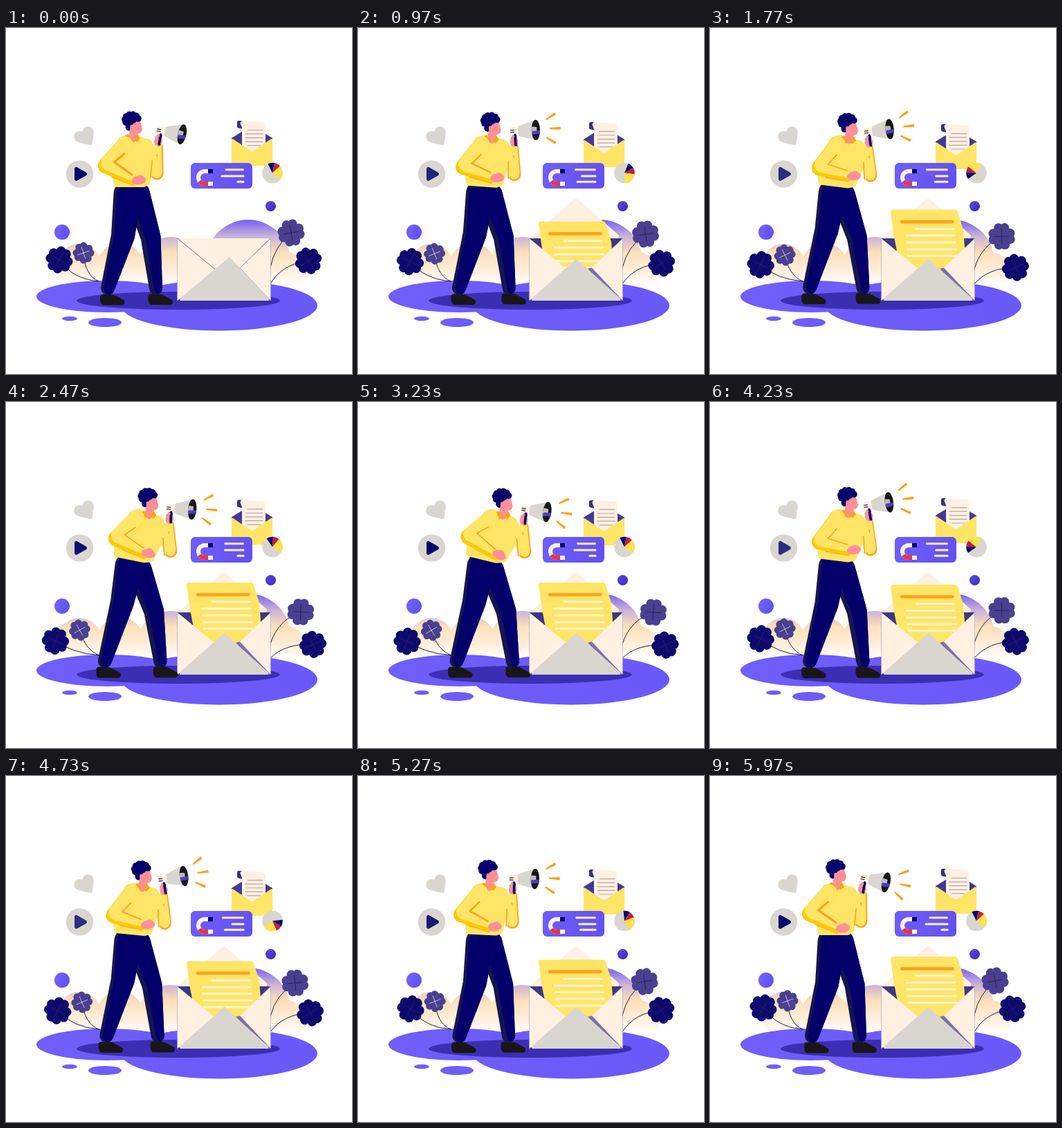
Write an HTML page with a canvas that moves like this. It is 500 px wide and 500 px high and loops after 6000 ms.

```html
<!DOCTYPE html>
<html lang="en">
<head>
<meta charset="utf-8">
<title>Announcement</title>
<style>
html, body { margin: 0; width: 100%; height: 100%; overflow: hidden; background: #fff; }
canvas { display: block; width: 100vw; height: 100vh; }
</style>
</head>
<body>
<canvas id="stage" width="500" height="500"></canvas>
<script>
const ctx = document.getElementById('stage').getContext('2d');
const LOOP = 6000, TAU = Math.PI * 2, RAD = Math.PI / 180;
const NAVY = '#04006b', DARK = '#15154f', SKIN = '#ff8f97', YELLOW = '#ffe566', GOLD = '#ffc800',
  ORANGE = '#ffa01c', CREAM = '#fff0e2', GREY = '#d9d6d0', PLUM = '#4a4090', BLACK = '#171717';

const clamp = x => Math.max(0, Math.min(1, x));
const lerp = (a, b, k) => a + (b - a) * k;
const ease = x => (1 - Math.cos(Math.PI * clamp(x))) / 2;
const cubic = x => x < .5 ? 4 * x ** 3 : 1 - 4 * (1 - x) ** 3;
const wave = (t, period) => (1 - Math.cos(TAU * t / period)) / 2;

function trace(p, r = 0) {
  const n = p.length;
  ctx.beginPath();
  ctx.moveTo((p[n - 2] + p[0]) / 2, (p[n - 1] + p[1]) / 2);
  for (let i = 0; i < n; i += 2) {
    const x = p[i], y = p[i + 1], nx = p[(i + 2) % n], ny = p[(i + 3) % n];
    const px = p[(i + n - 2) % n], py = p[(i + n - 1) % n];
    const d = Math.min(Math.hypot(nx - x, ny - y), Math.hypot(px - x, py - y));
    r ? ctx.arcTo(x, y, nx, ny, Math.min(r, d / 2)) : ctx.lineTo(x, y);
  }
  ctx.closePath();
}
function poly(p, fill, r) { trace(p, r); ctx.fillStyle = fill; ctx.fill(); }
function oval(x, y, rx, ry, fill, rot = 0) {
  ctx.beginPath();
  ctx.ellipse(x, y, rx, ry, rot, 0, TAU);
  ctx.fillStyle = fill;
  ctx.fill();
}
const disc = (x, y, r, fill) => oval(x, y, r, r, fill);
function line(p, color, w, cap = 'round') {
  ctx.beginPath();
  ctx.moveTo(p[0], p[1]);
  for (let i = 2; i < p.length; i += 2) ctx.lineTo(p[i], p[i + 1]);
  ctx.strokeStyle = color;
  ctx.lineWidth = w;
  ctx.lineCap = cap;
  ctx.lineJoin = 'round';
  ctx.stroke();
}
function grad(x0, y0, x1, y1, ...stops) {
  const g = ctx.createLinearGradient(x0, y0, x1, y1);
  stops.forEach((s, i) => g.addColorStop(i / (stops.length - 1), s));
  return g;
}
function at(x, y, rot, draw) {
  ctx.save();
  ctx.translate(x, y);
  ctx.rotate(rot);
  draw();
  ctx.restore();
}
// tapered tube through joints, one radius per joint
function limb(joints, radii, fill) {
  ctx.beginPath();
  for (let i = 1; i < joints.length; i++) {
    const [ax, ay] = joints[i - 1], [bx, by] = joints[i], ra = radii[i - 1], rb = radii[i];
    const dir = Math.atan2(by - ay, bx - ax);
    const off = Math.acos((ra - rb) / Math.hypot(bx - ax, by - ay));
    ctx.moveTo(ax + ra * Math.cos(dir + off), ay + ra * Math.sin(dir + off));
    ctx.arc(ax, ay, ra, dir + off, dir - off + TAU);
    ctx.arc(bx, by, rb, dir - off, dir + off);
    ctx.closePath();
  }
  ctx.fillStyle = fill;
  ctx.fill();
}
function shadedLimb(joints, radii, fill, shade, dx, dy) {
  ctx.save();
  limb(joints, radii, shade);
  ctx.clip();
  ctx.translate(dx, dy);
  limb(joints, radii, fill);
  ctx.restore();
}

function hills() {
  ctx.save();
  ctx.beginPath();
  for (const [x, y, r] of [[350, 338, 61], [402, 356, 33], [238, 352, 50], [165, 345, 34], [106, 344, 32]]) {
    ctx.moveTo(x + r, y);
    ctx.arc(x, y, r, 0, TAU);
  }
  ctx.rect(80, 350, 353, 22);
  ctx.clip();
  ctx.fillStyle = grad(0, 277, 0, 372, '#7462f5', '#c9b1d8', '#fddfb9', '#feedd8', '#ffffff');
  ctx.fillRect(60, 270, 400, 102);
  ctx.restore();
}

function ground() {
  const g = grad(44, 380, 450, 420, '#6f5ef8', '#6a59f9');
  oval(146, 388, 102, 23, g);
  oval(308, 401, 142, 36.5, g);
  oval(249, 394, 147, 13, '#3b2eb3');
  oval(92, 420, 11, 3.3, g);
  oval(143, 425.5, 24, 6.6, g);
}

function clover(x, y, r, rot, fill, vein) {
  at(x, y, rot, () => {
    disc(0, 0, r * .5, fill);
    for (let i = 0; i < 4; i++) {
      ctx.rotate(Math.PI / 2);
      disc(r * .63, -r * .3, r * .37, fill);
      disc(r * .63, r * .3, r * .37, fill);
    }
    for (let i = 0; i < 4; i++) {
      ctx.rotate(Math.PI / 2);
      line([0, 0, r * .42, r * .42], vein, .8);
    }
  });
}
function flower(x, y, r, rot, fill, vein, cx, cy, ex, ey) {
  ctx.beginPath();
  ctx.moveTo(x, y);
  ctx.quadraticCurveTo(cx, cy, ex, ey);
  ctx.strokeStyle = '#262230';
  ctx.lineWidth = 1;
  ctx.stroke();
  clover(x, y, r, rot, fill, vein);
}
function flowers(a) {
  const blue = '#0e0a6d', edge = '#252166';
  flower(77 - 6 * a, 335 + 11 * a, 18.5, -.25 - a * .15, blue, edge, 96, 363, 134, 366);
  flower(112 - 6 * a, 325 + 5 * a, 14.5, .45 - a * .2, PLUM, '#d4c9e8', 114, 358, 134, 366);
  flower(412 + 15 * a, 296 + 8 * a, 18.5, .6 + a * .25, PLUM, '#24204e', 388 + 5 * a, 315, 382, 346 + 4 * a);
  flower(437 + 7 * a, 336.5 + 15 * a, 18.5, .15 + a * .2, blue, edge, 398 + 6 * a, 341 + 8 * a, 382, 370);
}

function icons(u, a, b) {
  // heart
  disc(106, 157, 7.9, GREY);
  disc(118.5, 150.5, 8.3, GREY);
  poly([103, 164.6, 124.5, 169.5, 126.8, 150, 112, 150], GREY, 2.5);
  // play button
  disc(106.5, 211, 19.7, GREY);
  ctx.globalAlpha = 1 - .22 * b;
  poly([99, 199, 119.5, 211, 99, 222.5], NAVY, 2.5);
  ctx.globalAlpha = 1;

  disc(81, 295, 11, grad(70, 290, 92, 300, '#7261fa', '#6150ee'));
  disc(382.5, 257.5, 7.6, grad(375, 250, 390, 265, '#5b4ae8', '#3a2bb5'));

  at(0, 8 * a, 0, smallMail);

  // pie
  at(385, 209.5, cubic(u / 3000) * TAU, () => {
    disc(0, 0, 14.8, GREY);
    [[-116, -78, NAVY], [-78, -42, '#c41f3d'], [-42, 38, '#ffe04d']].forEach(([s, e, fill]) => {
      ctx.beginPath();
      ctx.moveTo(0, 0);
      ctx.arc(0, 0, 14.8, s * RAD, e * RAD);
      ctx.fillStyle = fill;
      ctx.fill();
    });
  });
  card(u, b);
}

function smallMail() {
  poly([326, 159, 355, 141, 385, 159, 385, 180, 326, 180], '#43389b', 1);
  poly([334, 134, 342, 134, 342, 146, 334, 144], '#383083', 2);
  poly([337, 134, 373, 136, 375, 142, 375, 181, 341, 181, 341, 144], CREAM, 3);
  for (let i = 0; i < 5; i++)
    line([i % 4 ? 346 : 349, 147.5 + i * 5.6, i < 4 ? 371 : 368, 147.5 + i * 5.6], '#b5a5a5', 1.2);
  poly([326, 159, 355.5, 179, 385, 159, 385, 199, 326, 199], YELLOW, 1.2);
}

function card(u, b) {
  poly([267, 195, 356, 195, 356, 232, 267, 232], grad(267, 200, 356, 228, '#6f5efa', '#6251ee'), 6);
  // magnet
  line([287, 207, 299, 207], CREAM, 6, 'butt');
  line([287, 225, 299, 225], CREAM, 6, 'butt');
  ctx.beginPath();
  ctx.arc(287, 216, 9, -90 * RAD, 90 * RAD, true);
  ctx.stroke();
  line([292, 207, 299, 207], NAVY, 6, 'butt');
  line([287, 225, 292, 225], '#ee3347', 6, 'butt');
  ctx.beginPath();
  ctx.arc(287, 216, 9, 145 * RAD, 90 * RAD, true);
  ctx.stroke();
  // text bars
  const x = u < 1150 ? lerp(335, 316, ease(u / 1150)) : lerp(316, 335, ease((u - 1150) / 1250));
  line([318 - 5 * b, 204.8, 342.5, 204.8], '#ffe9a8', 3);
  line([312 + 16 * b, 214, 343, 214], CREAM, 3);
  line([x, 222.3, 343, 222.3], CREAM, 3);
}

function letter(t) {
  const rest = 1 - clamp((t - 350) / 1750);
  const dip = t > 3690 ? 6.5 * wave(t - 3690, 2280) : 0;
  at(0, 45 * rest * rest + dip, 0, () => {
    poly([260.5, 261, 357, 261, 366, 290, 368.5, 321, 366, 372, 280, 372, 266, 300], YELLOW, 3);
    line([277, 278.5, 350.5, 278.5], ORANGE, 4.6);
    for (let i = 0; i < 5; i++) {
      const y = 288.8 + i * 9.7;
      line([i ? 282.5 + i : 298, y, 352 + i * 1.2, y], '#fff3d2', 3);
    }
  });
}

function bigMail(t) {
  const k = ease(t / 520);
  const h = lerp(60, -59, k), tip = lerp(320.6, 315, k);
  const flap = [248, 304, tip, 304 + h, 382, 304];
  if (h < 0) poly(flap, CREAM, 3);
  poly([247.5, 304, 382.5, 304, 382.5, 394, 247.5, 394], '#3f3682');
  ctx.save();
  ctx.beginPath();
  ctx.rect(240, 230, 150, 164);
  ctx.clip();
  if (t > 250) letter(t);
  ctx.restore();
  poly([247.5, 304, 306, 352, 247.5, 394], CREAM);
  poly([382.5, 304, 337, 347.5, 382.5, 394], CREAM);
  poly([332, 347.5, 338, 346.5, 382.5, 394, 370, 394], '#7a70a8');
  if (h > 0) {
    poly(flap, CREAM);
    line(flap, 'rgba(90,80,85,.75)', .7);
  }
  poly([247.5, 394, lerp(323, 315.5, k), lerp(331, 333.5, k), 382.5, 394], GREY, 2);
}

function legs(a) {
  const shoe = (x, y) => at(x, y, 0, () => poly([0, 0, 20, 1, 35, 9, 36, 16, 2, 16, 0, 10], BLACK, 4));
  shoe(136 - 6 * a, 384.5 - 2 * a);
  shoe(205.5 + 8 * a, 384 - 2 * a);
  shadedLimb([[190 + 3 * a, 240 + 3 * a], [209 + 5 * a, 302], [216.5 + 7 * a, 376 - a]], [18, 14.5, 9.5], NAVY, DARK, 7, 0);
  shadedLimb([[176 + 2 * a, 240 - 3 * a], [169 - a, 300 - 12 * a], [147 - 4.5 * a, 376 - 2 * a]], [20.5, 17, 10], NAVY, DARK, 4.5, 0);
}

function head(q) {
  const near = Math.min(q, 1), far = q - near;
  at(17 * near + 10.5 * far, 2.5 * near + 2 * far, 0, () => {
    disc(178, 143, 5.5, NAVY);
    poly([181, 133, 193, 131, 197, 146, 195.5, 151, 189.5, 153, 190, 162, 183, 166, 176, 161, 179, 148], SKIN, 2.5);
    oval(181, 132, 9, 6.5, NAVY);
    for (let i = 0; i < 7; i++) {
      const ang = (150 + i * 33) * RAD;
      disc(181.5 + 9.8 * Math.cos(ang), 132.5 + 7.8 * Math.sin(ang), 4.7, NAVY);
    }
    disc(180, 137, 4, NAVY);
    oval(181.5, 143, 2.2, 3.2, SKIN);
    poly([172, 156, 176, 153, 183, 161, 177, 165], ORANGE, 1);
    poly([185, 161, 190, 153, 194, 160, 189, 165], ORANGE, 1);
  });
}

function megaphone(x, y, tilt, t) {
  at(x, y, tilt * RAD, () => {
    poly([-2.5, -10, 3.5, -10, 4.5, 8, -1, 9], NAVY, 1.5);
    poly([-6.5, -19.5, 7, -20, 7, -7, -6.5, -8], CREAM, 2);
    line([-5, -15, 0, -15], BLACK, 1.2);
    line([-5, -12, 0, -12], BLACK, 1.2);
    poly([6, -20.5, 30, -29, 32, -14, 30, 0, 6, -7], GREY, 2);
    ctx.save();
    oval(31.5, -14.6, 6.2, 14.7, BLACK);
    ctx.clip();
    poly([24, -20, 33, -19, 33, -9, 24, -8], '#bdb9bb', 1);
    poly([26, -13, 38, -14, 38, -9, 26, -8], '#4b3cc8', 1);
    ctx.restore();

    const len = 16 * ease((t - 250) / 450);
    for (const k of len ? [-1, 0, 1] : [])
      at(30.5 + 21 * Math.cos(40 * RAD * k), -16.5 + 20 * Math.sin(40 * RAD * k), 32 * RAD * k, () =>
        poly([0, -1, len, -2, len, 2, 0, 1], ORANGE, .6));

    oval(0, 2, 5.8, 6.8, SKIN, .2);
    line([1.5, -8, 2, 6], NAVY, 3.6);
    line([-4, -3, -1, -6], SKIN, 3.4);
  });
}

// each joint: leaning back, middle, leaning forward
const JOINTS = {
  shoulderL: [[172, 168], [184, 168], [192, 168]],
  elbowL: [[144.5, 199], [158.5, 202], [160, 194]],
  wristL: [[183, 220], [199, 214], [200, 222]],
  shoulderR: [[202, 170], [213, 172], [221, 176]],
  elbowR: [[218, 210], [232, 213], [241.5, 217]],
  wristR: [[220.5, 172], [229.5, 174], [241, 180]]
};
function joint(name, q) {
  const i = q < 1 ? 0 : 1, [p, n] = JOINTS[name].slice(i);
  return [lerp(p[0], n[0], q - i), lerp(p[1], n[1], q - i)];
}

function man(t, u, a, b) {
  const q = u < 1770 ? ease(u / 1770) : 1 + ease((u - 1770) / 1230);
  const [sl, el, wl, sr, er, wr] = Object.keys(JOINTS).map(name => joint(name, q));
  const lean = q / 2;
  legs(a);
  shadedLimb([er, wr], [9.5, 6.3], YELLOW, ORANGE, -2, -3);
  megaphone(wr[0], wr[1] - 10.5, 12 - 3 * lean - (t < 3000 ? 17 : 19.5) * b, t);

  // sweater, with the raised upper arm
  line([er[0] - 5, er[1] + 5, lerp(sr[0], er[0], .35) + 10, lerp(sr[1], er[1], .35)], ORANGE, 3);
  limb([sr, er], [10.5, 7], YELLOW);
  poly([sl[0] - 9, sl[1] - 10, sl[0] + 4, sl[1] - 14, sr[0] - 10, sr[1] - 14, sr[0] + 5, sr[1] - 8,
    sr[0] + 9, sr[1] + 28, 208 + 5 * lean, 226 + 6 * lean, 200, 230 + 3 * lean, 156, 230 - 8 * lean,
    154 + 3 * lean, 213 - 8 * lean], YELLOW, 6);
  line([er[0] - 9, er[1] + 6, sr[0] + 9, sr[1] + 22], ORANGE, 1.6);
  head(q);

  // lowered arm across the body
  line([lerp(el[0], wl[0], .25), lerp(el[1], wl[1], .25) + 10, wl[0], wl[1] + 6], ORANGE, 4);
  shadedLimb([sl, el, wl], [11.5, 11.5, 7], YELLOW, GOLD, 4, -4);
  line([wl[0] - 1, wl[1] - 8, el[0] + 12, el[1] - 5, lerp(el[0] + 12, sl[0] + 8, .6), lerp(el[1] - 5, sl[1] + 6, .6)],
    ORANGE, 3 - Math.min(1, q) * 1.3);
  const turn = q > 1 ? .6 * (q - 1) - .1 : -.1;
  oval(wl[0] + 9 - 5 * Math.max(0, q - 1), wl[1], 10.2, 6.3, SKIN, turn);
  oval(wl[0] + 11 - 5 * Math.max(0, q - 1), wl[1] - 3, 5, 4.6, SKIN, turn);
}

function draw(t) {
  const u = Math.min(t, LOOP - t), a = wave(t, 6000), b = wave(t, 3000);
  ctx.fillStyle = '#fff';
  ctx.fillRect(0, 0, 500, 500);
  hills();
  ground();
  flowers(a);
  icons(u, a, b);
  bigMail(t);
  man(t, u, a, b);
}

let start = null;
function tick(now) {
  if (start === null) start = now;
  draw((now - start) % LOOP);
  requestAnimationFrame(tick);
}
draw(0);
requestAnimationFrame(tick);
</script>
</body>
</html>
```
